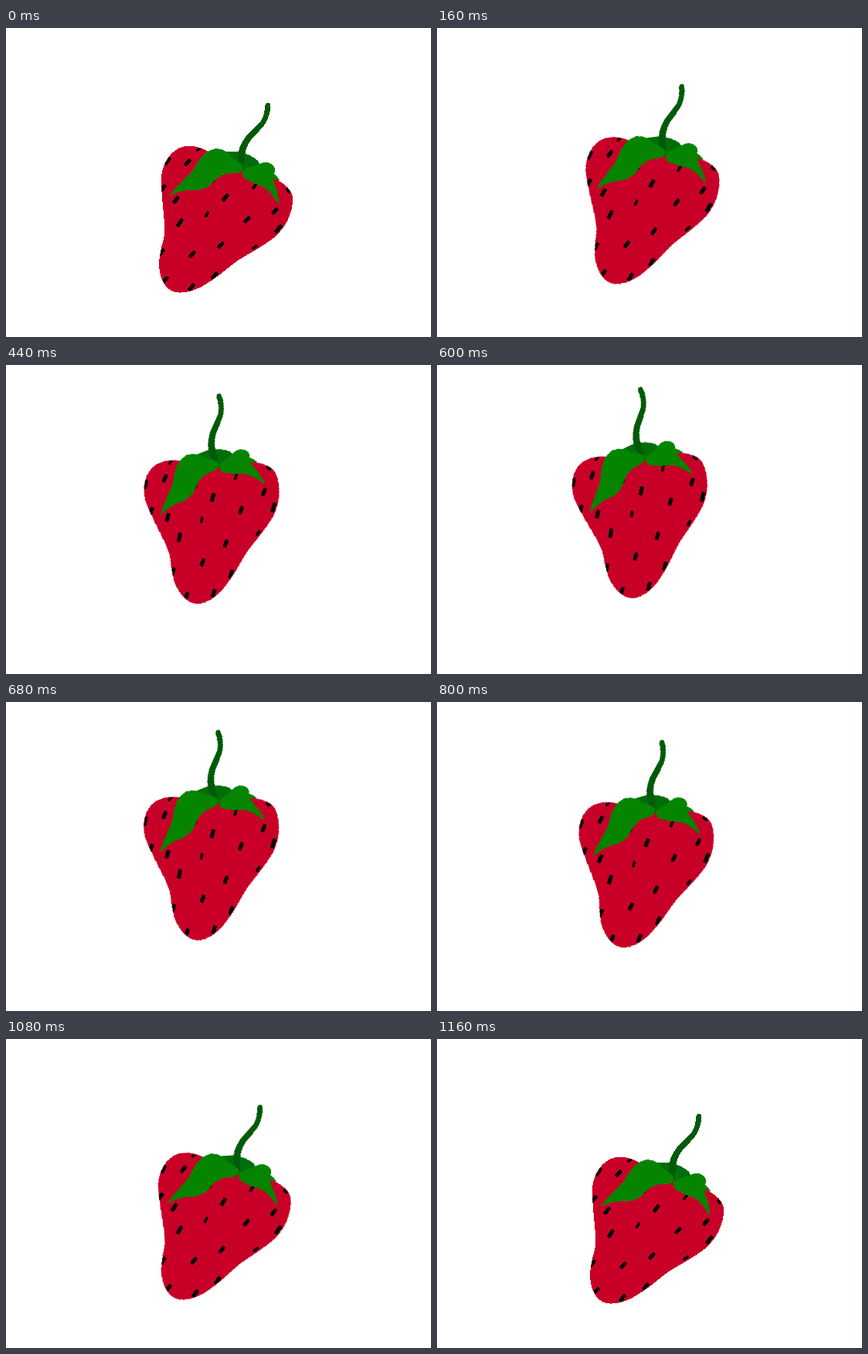
An HTML page that plays this animation: 550 px wide and 400 px high, repeating every 1.2 s.

```html
<!DOCTYPE html>
<html lang="en">
<head>
<meta charset="utf-8">
<title>Strawberry</title>
<style>
  html, body {
    margin: 0;
    width: 100%;
    height: 100%;
    overflow: hidden;
    background: #fff;
  }
  svg {
    display: block;
    width: 550px;
    height: 400px;
    shape-rendering: crispEdges;
  }
  /* 25 fps: 14 steps up, 15 steps back, one frame of rest */
  .berry {
    transform-origin: 264px 255px;
    animation: sway 1200ms -2ms infinite;
  }
  @keyframes sway {
    0% {
      transform: translate(0px, 0px) rotate(0deg);
      animation-timing-function: steps(14, end);
    }
    46.6667% {
      transform: translate(-2.6px, -55px) rotate(-27deg);
      animation-timing-function: steps(15, end);
    }
    96.6667%, 100% {
      transform: translate(0px, 0px) rotate(0deg);
    }
  }
  .flesh { fill: #c80028; stroke: #c80028; }
  .leaf { fill: #048400; }
  .under { fill: #006e08; }
  .stem { fill: #005a08; }
  .seeds {
    fill: none;
    stroke: #000;
    stroke-linecap: round;
    stroke-width: 5;
  }
  .seeds.thin { stroke-width: 3.6; }
</style>
</head>
<body>
<svg viewBox="0 0 550 400">
  <defs>
    <path id="body" d="M238 153 C220 153 207 168 203 186 C200 202 204 226 205 242
      C206 254 208 262 205 273 C202 284 199 294 199 306 C200 327 208 341 224 342
      C242 343 259 332 274 321 C286 312 294 304 306 297 C321 288 335 281 347 271
      C361 259 371 241 371 222 C371 209 361 203 350 196 C330 182 290 172 264 161
      C256 157 247 153 238 153 Z"/>
    <clipPath id="skin"><use href="#body"/></clipPath>
  </defs>
  <g class="berry">
    <g transform="translate(-.5 0)">
      <use href="#body" class="flesh"/>
      <g clip-path="url(#skin)">
        <path class="seeds" d="M211.500 169l-4 6M237.500 171.500l-4 5M205.500 205l-4 5
          M222.500 220l-4 5M227.500 249l-4 6M286.500 216.500l-4 5.500M314.500 245.500l-4 5
          M271.500 193l-4 5M350.500 234.500l-4 5M355.500 257l-5 6M280.500 278.500l-4 5
          M243.500 290.500l-4 5M203.500 288l-4 5M208.500 323.500l-4 5M242.500 333l-4 5
          M272.500 318l-4 5"/>
        <path class="seeds thin" d="M262 239l-3 4.500M251.500 156l-3 2M324.500 202l-4 5
          M364.500 209l2 3M324.500 282l-4 3"/>
      </g>
    </g>
    <path class="under" d="M282 162 C291 157 310 160 321 168 C328 172 331 178 325 183
      C317 188 300 187 292 180 Z"/>
    <path class="leaf" d="M345 186 C349 190 352 193 354 197 L347 196 Z"/>
    <path class="stem" d="M335.500 100 C336 95.300 342.500 95.500 342.400 100.500
      C342 109 339.700 116.500 336.300 122.500 C331.300 131.500 323.300 136.500 317.300 144.500
      C310.300 153.500 308.500 163 308.500 172 C308.500 176 307.500 181 305.500 185
      C301.500 182 299.500 177 299.500 171 C299.500 160 303.500 149 310.300 140.500
      C316.300 132.500 325.300 127.500 330.300 119.500 C334.300 112.500 334.700 107 335.500 100 Z"/>
    <path class="leaf" d="M211.500 217 C220 204 233 196 241 185 C249 173 255 160 268 157
      C279 154 289 161 292.500 168 C297 170 303 174 306 179 C307 185 303 187.500 297 188
      C286 187 275 191 269 199 C262 208 252 210 242 210 C230 210 221 212 211.500 217 Z"/>
    <path class="leaf" d="M306 184 C313 179 322 179 328 176 C335 172 346 174 348 182
      C349 187 345 191 345.500 196 C348 205 353 214 353.500 229 C347 220 343 212 335 207
      C326 202 314 200 306 192 Z"/>
  </g>
</svg>
</body>
</html>
```
